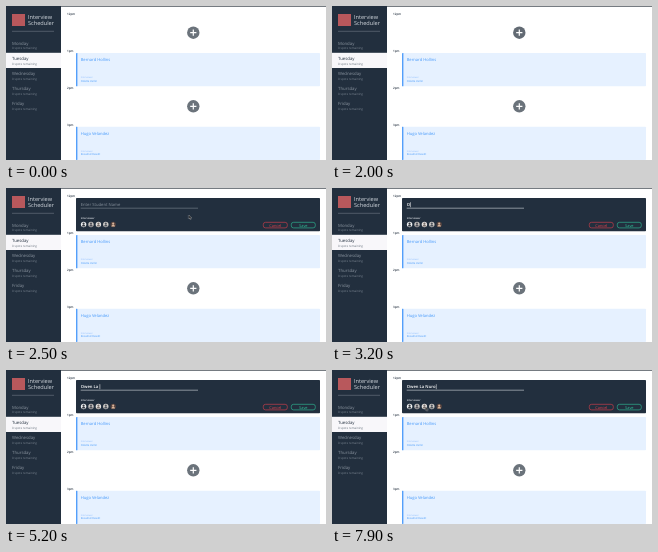
Write an HTML page that moves like this. It is 320x154 px and loops after 8000 ms.

```html
<!DOCTYPE html>
<html lang="en">
<head>
<meta charset="utf-8">
<title>Interview Scheduler</title>
<style>
  html, body { margin: 0; width: 100%; height: 100%; overflow: hidden; background: #fff; }
  svg { display: block; width: 100vw; height: 100vh; }
  text { font-family: "Open Sans", "Noto Sans", sans-serif; text-rendering: geometricPrecision; white-space: pre; }

  .title { font-size: 5.6px; fill: #d5dae0; }
  .day { font-size: 4.3px; fill: #8c96a1; }
  .spots { font-size: 3px; fill: #7e8995; }
  .on .day { fill: #222f3e; }
  .on .spots { fill: #65707b; }
  .hour { font-size: 3px; font-weight: 600; fill: #222f3e; }
  .card rect { fill: #e6f1ff; }
  .card .edge { fill: #539ffa; }
  .student { font-size: 4.1px; fill: #4398fa; }
  .role { font-size: 2.3px; fill: #8fbffb; }
  .host { font-size: 2.7px; fill: #4398fa; }
  .entry { font-size: 4.2px; }
  .hint { fill: #89939e; }
  .typed { fill: #fff; font-weight: 600; }
  .label { font-size: 2.5px; fill: #e4e8ec; font-weight: 600; }
  .button rect { fill: none; stroke: currentColor; stroke-width: .6; }
  .button text { fill: currentColor; font-size: 3.9px; text-anchor: middle; }
  .disc { fill: #6b737b; }

  .disc.hot { animation: hover 8s linear infinite; }
  .form { animation: open 8s step-end infinite; }
  .focus { animation: focus 8s step-end infinite; }
  .pointer { animation: move 8s linear infinite, show 8s step-end infinite; }

  @keyframes hover { 0%, 24.5% { fill: #6b737b } 28.5%, 100% { fill: #222f3e } }
  @keyframes open { 0% { visibility: hidden } 30.75%, 100% { visibility: visible } }
  @keyframes focus { 0% { stroke: #8d969f } 36.5%, 100% { stroke: #f2f4f6 } }
  @keyframes show {
    0% { opacity: 0 }
    5.75% { opacity: 1 }
    22.25% { opacity: 0 }
    30.75% { opacity: 1 }
    39.5% { opacity: 0 }
    89.5%, 100% { opacity: 1 }
  }
  @keyframes move {
    0%, 5.75% { transform: translate(161px, 146px) }
    8.75% { transform: translate(168px, 112px) }
    12% { transform: translate(179px, 65px) }
    15% { transform: translate(183px, 41px) }
    16.25% { transform: translate(184.5px, 34px) }
    20%, 29% { transform: translate(186.5px, 25px) }
    31.25% { transform: translate(183px, 27px) }
    33.5% { transform: translate(145px, 22px) }
    36.25% { transform: translate(97px, 17px) }
    38.75%, 89% { transform: translate(88px, 16px) }
    93% { transform: translate(90px, 25px) }
    97.5%, 100% { transform: translate(93.5px, 36.5px) }
  }
</style>
</head>
<body>
<svg viewBox="0 0 320 154" preserveAspectRatio="none">
  <rect width="320" height="154" fill="#fff"/>
  <rect x="55" width="265" height=".7" fill="#3a424b"/>
  <rect width="55" height="154" fill="#222f3e"/>
  <rect x="6" y="8" width="13" height="12" fill="#b8585c"/>
  <text class="title" x="22" y="13.3">Interview</text>
  <text class="title" x="22" y="19.2">Scheduler</text>
  <path d="M6 25.3H48" stroke="#7d8791" stroke-width=".5"/>
  <g id="days"></g>
  <g id="hours"></g>
  <g id="cards"></g>
  <g id="adds"></g>

  <g class="form">
    <rect x="70" y="10" width="244" height="33.2" rx=".8" fill="#222f3e"/>
    <text class="entry hint" id="hint" x="74.7" y="18.3">Enter Student Name</text>
    <text class="entry typed" id="typed" x="74.7" y="18.3"></text>
    <rect id="caret" y="14.2" width=".5" height="5" fill="#fff"/>
    <path class="focus" d="M74.7 20.2H192" stroke-width=".5"/>
    <text class="label" x="74.7" y="31.2">Interviewer</text>
    <g id="faces"></g>
    <g class="button" color="#e0404c">
      <rect x="257.3" y="34.3" width="24" height="5.6" rx="2.2"/>
      <text x="269.3" y="38.5">Cancel</text>
    </g>
    <g class="button" color="#30c49a">
      <rect x="285.3" y="34.3" width="24" height="5.6" rx="2.2"/>
      <text x="297.3" y="38.5">Save</text>
    </g>
  </g>
  <path class="pointer" d="M0 0V3.9L.9 3.1L1.5 4.5L2.2 4.2L1.6 2.8H2.8Z" fill="#111" stroke="#fff" stroke-width=".3"/>
</svg>
<script>
  const $ = id => document.getElementById(id);
  const fill = (id, items, draw) => { $(id).innerHTML = items.map(draw).join(""); };
  const text = (cls, x, y, str) => `<text class="${cls}" x="${x}" y="${y}">${str}</text>`;

  fill("days", ["Monday", "Tuesday", "Wednesday", "Thursday", "Friday"], (day, i) => {
    const y = 38.6 + i * 15.2, on = i === 1;
    return `<g class="${on ? "on" : ""}">` +
      (on ? `<rect y="46.8" width="55" height="15.2" fill="#f8f7fa"/>` : "") +
      text("day", 6, y, day) + text("spots", 6, y + 4.7, "0 spots remaining") + "</g>";
  });

  fill("hours", ["12pm", "1pm", "2pm", "3pm"], (hour, i) =>
    text("hour", 61, 9.3 + i * 36.8, hour));

  const booked = [
    [47, "Bernard Hollins", "Odette Varlin"],
    [120.7, "Hugo Velandez", "Rosalind Hewitt"]
  ];
  fill("cards", booked, ([y, student, host]) =>
    `<g class="card"><rect x="70" y="${y}" width="244" height="33.3" rx=".8"/>
     <rect class="edge" x="70" y="${y}" width="1.4" height="33.3" rx=".4"/>` +
    text("student", 74.7, y + 7.8, student) +
    text("role", 74.7, y + 24.8, "Interviewer") +
    text("host", 74.7, y + 28.6, host) + "</g>");

  fill("adds", [26.7, 100.3], (y, i) =>
    `<circle class="disc ${i ? "" : "hot"}" cx="187.3" cy="${y}" r="6.2"/>
     <path d="M184.2 ${y}h6.2M187.3 ${y - 3.1}v6.2" stroke="#fff" stroke-width="1.2"/>`);

  const tones = [["#eceef0", "#30353d"], ["#c3c0bd", "#50515a"], ["#e5e2df", "#756c69"],
                 ["#d0ccc8", "#4e555d"], ["#55423e", "#d9b69c"]];
  fill("faces", tones, ([back, body], i) => {
    const x = 77.6 + i * 7.4;
    return `<circle cx="${x}" cy="36.5" r="2.7" fill="${back}"/>
      <circle cx="${x}" cy="35.7" r="1.1" fill="${body}"/>
      <path d="M${x - 1.8} 38.5a1.8 1.7 0 0 1 3.6 0z" fill="${body}"/>`;
  });

  const LOOP = 8000, NAME = "Owen La Nuro", FOCUS = 2920;
  const keys = [3160, 3460, 4160, 4360, 4560, 4760, 4960, 5160, 5460, 5760, 6620, 6840];
  let start;

  function tick(now) {
    start ??= now;
    const t = (now - start) % LOOP;
    const count = keys.filter(k => k <= t).length;
    const typed = $("typed"), caret = $("caret");
    typed.textContent = NAME.slice(0, count);
    $("hint").style.display = count ? "none" : "";
    const since = t - (count ? keys[count - 1] : FOCUS);
    caret.setAttribute("x", 75 + (count ? typed.getComputedTextLength() : 0));
    caret.style.display = since >= 0 && since % 1000 < 500 ? "" : "none";
    requestAnimationFrame(tick);
  }
  requestAnimationFrame(tick);
</script>
</body>
</html>
```
